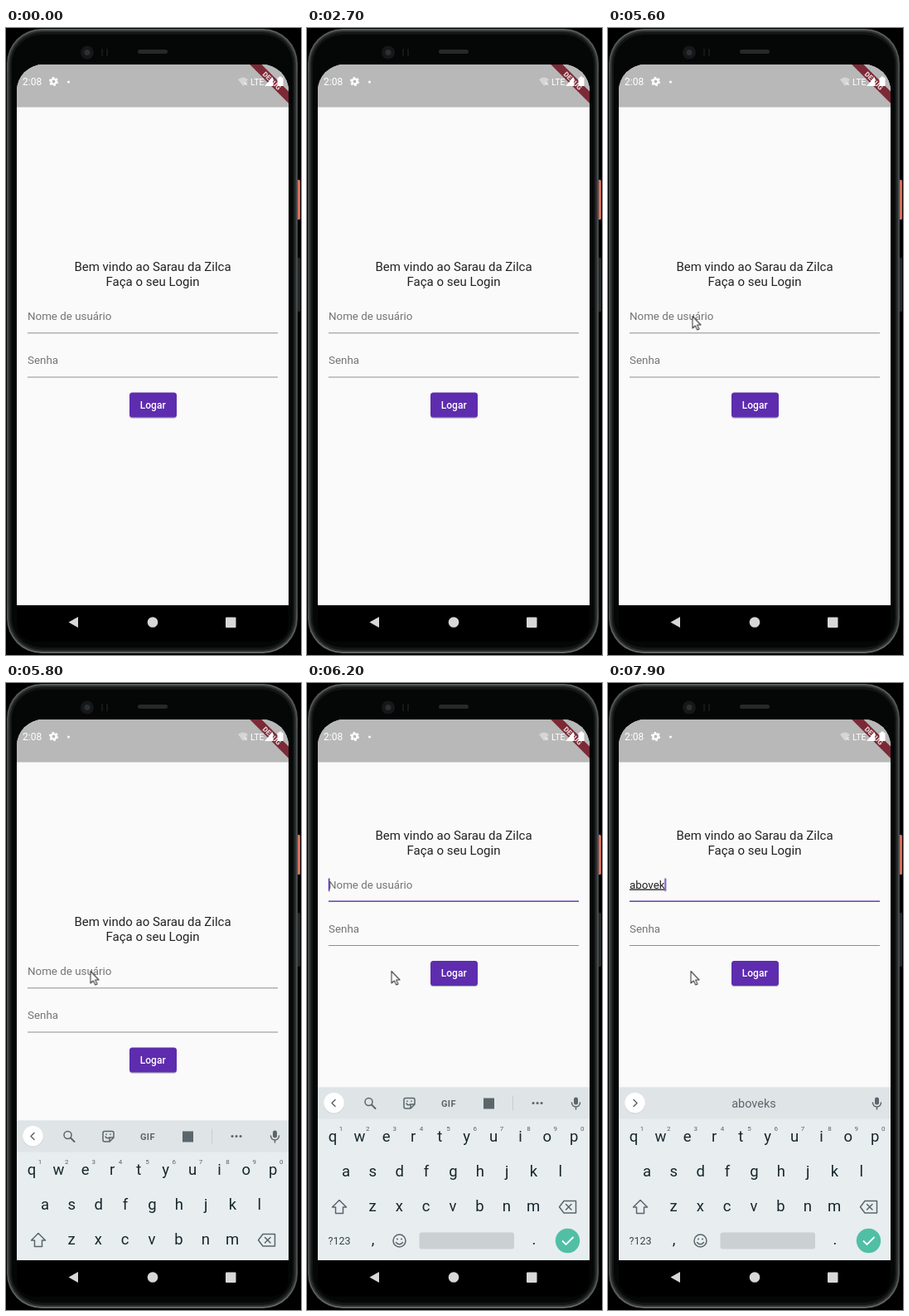
These frames come from a looping animation (356x756 px, 8000 ms). An HTML page:

```html
<!DOCTYPE html>
<html lang="pt-BR">
<head>
<meta charset="utf-8">
<title>Login</title>
<style>
  html, body { margin: 0; height: 100%; overflow: hidden; background: #000; }
  svg { display: block; width: 100vw; height: 100vh; font-family: Roboto, sans-serif; }
  .mid { text-anchor: middle; }
  .title { font-size: 15px; fill: #222; }
  .input { font-size: 13.36px; fill: #222; }
  .hint { font-size: 13.36px; fill: #747474; }
  .key { font-size: 18.5px; fill: #17272c; }
  .digit { font-size: 8px; fill: #56636a; }
  .word { font-size: 14.5px; fill: #5c676c; }
  .icon { fill: none; stroke: #5a666b; stroke-width: 1.5; stroke-linejoin: round; stroke-linecap: round; }
  .solid { fill: #5a666b; }
</style>
</head>
<body>
<svg viewBox="0 0 356 756">
  <defs>
    <linearGradient id="rim" x2="0" y2="1">
      <stop offset="0" stop-color="#5a5d5d"/><stop offset=".08" stop-color="#474a4a"/>
      <stop offset=".92" stop-color="#474a4a"/><stop offset="1" stop-color="#626565"/>
    </linearGradient>
    <clipPath id="screen"><path d="M13 696V76A32 32 0 0 1 45 44H309A32 32 0 0 1 341 76V696Z"/></clipPath>
  </defs>

  <!-- phone body -->
  <rect x="351" y="183" width="4" height="48" rx="1.5" fill="#d9705f"/>
  <rect x="351" y="277" width="4" height="65" rx="1.5" fill="#25292a"/>
  <rect x="1" y="1" width="351" height="753" rx="42" fill="url(#rim)"/>
  <rect x="3" y="3" width="347" height="749" rx="40" fill="#2b2e2e"/>
  <rect x="5" y="5" width="343" height="745" rx="38" fill="#131515"/>
  <rect x="7" y="8" width="339" height="739" rx="36" fill="#050606"/>
  <circle cx="98" cy="29.500" r="8" fill="#151718"/>
  <circle cx="98" cy="29.500" r="3.500" fill="#2b3032"/>
  <path d="M116 25V34M122 25V34" stroke="#151718" stroke-width="2"/>
  <rect x="159" y="26" width="36" height="5" rx="2.500" fill="#262929"/>
  <path d="M13 696H341V716Q341 740 315 740H39Q13 740 13 716Z" fill="#000"/>

  <g clip-path="url(#screen)">
    <rect x="13" y="43" width="328" height="654" fill="#fafafa"/>
    <rect x="13" y="43" width="328" height="52.500" fill="#b8b8b8"/>

    <g transform="translate(341 43.5) rotate(45)">
      <rect x="-33.400" y="23.400" width="66.800" height="10" fill="#7c2936"/>
      <text class="mid" y="31.500" font-size="8.500" font-weight="900" fill="#e6d4d6">DEBUG</text>
    </g>

    <!-- status bar -->
    <g fill="#fff">
      <text x="20" y="69" font-size="12">2:08</text>
      <circle cx="57.500" cy="64.500" r="3.100" fill="none" stroke="#fff" stroke-width="2.400"/>
      <circle cx="57.500" cy="64.500" r="4.700" fill="none" stroke="#fff" stroke-width="1.800" stroke-dasharray="2.46"/>
      <circle cx="75.500" cy="65" r="1.500"/>
      <path d="M280 62Q286 57 292 62L286 70Z" opacity=".4"/>
      <path d="M287.500 65.500L291 69M291 65.500L287.500 69" stroke="#fff"/>
      <text x="295" y="68.500" font-size="10.500">LTE</text>
      <path d="M312 70L322 59V70Z"/>
      <path d="M327.500 60H329.500V58.500H332.500V60H334.500V70H327.500Z"/>
    </g>

    <g id="form">
      <text class="title mid" x="177" y="293">Bem vindo ao Sarau da Zilca</text>
      <text class="title mid" x="177" y="311">Faça o seu Login</text>
      <text id="hint" class="hint" x="26" y="352">Nome de usuário</text>
      <g id="typed"></g>
      <rect id="caret" x="25.800" y="340" width="1.700" height="15.500" fill="#6236b5"/>
      <path d="M26 367.800H328M26 421H328" stroke="#8e8e8e"/>
      <path id="focus" d="M26 367.800H328" stroke="#673ab7" stroke-width="1.800"/>
      <text class="hint" x="26" y="405.200">Senha</text>
      <rect x="149" y="441" width="57" height="30" rx="3.500" fill="#000" opacity=".12"/>
      <rect x="149" y="440" width="57" height="30.500" rx="3.500" fill="#000" opacity=".18"/>
      <rect x="149" y="439.500" width="57" height="30" rx="3.500" fill="#5e2cae"/>
      <text class="mid" x="177.200" y="458.700" font-size="12" font-weight="500" fill="#fff">Logar</text>
    </g>

    <g id="keyboard">
      <rect x="13" y="487.500" width="328" height="210" fill="#e8edf0"/>
      <rect x="13" y="487.500" width="328" height="38" fill="#dfe4e7"/>
      <circle cx="32.500" cy="507" r="12.500" fill="#000" opacity=".1"/>
      <circle cx="32.500" cy="506.300" r="12.300" fill="#fff"/>
      <g id="tools" class="icon">
        <path d="M34 502.500L30 506.500L34 510.500"/>
        <circle cx="74.500" cy="505" r="4.500"/><path d="M78 508.500L82.500 513" stroke-width="2"/>
        <path d="M119 500.500H128Q130 500.500 130 502.500V508L125 513H119Q117 513 117 511V502.500Q117 500.500 119 500.500ZM125 513V508H130M120 507Q122 510 124.500 508"/>
        <path d="M121 504V504.500M126 504V504.500"/>
        <text class="mid solid" x="171" y="510.500" font-size="11" font-weight="700" stroke="none" letter-spacing=".5">GIF</text>
        <rect class="solid" x="213" y="500.500" width="13" height="13" stroke="none"/>
        <path d="M248.500 498V515" stroke="#c6ccd0" stroke-width="1"/>
        <path d="M273 506.500H273.100M278 506.500H278.100M283 506.500H283.100" stroke-width="3"/>
      </g>
      <path id="opened" class="icon" d="M31 502.500L35 506.500L31 510.500"/>
      <path id="bars" d="M128.500 497V516M224.500 497V516" stroke="#c6ccd0"/>
      <g id="words"></g>
      <rect class="solid" x="322" y="499.500" width="5" height="9" rx="2.500"/>
      <path class="icon" d="M319.500 506Q320 511 324.500 511T329.500 506M324.500 511V514"/>
      <g id="keys"></g>
      <g class="icon">
        <path d="M39 623.500L47.500 632H43.500V639.500H34.500V632H30.500Z"/>
        <path d="M310 624.500H324.500V639H310L304.500 631.800ZM312.500 628.500L319 635M319 628.500L312.500 635"/>
        <circle cx="111.500" cy="672.500" r="7.500"/>
        <path d="M109 670.500V670.600M114 670.500V670.600" stroke-width="2"/>
        <path d="M107.500 674.500Q111.500 679 115.500 674.500"/>
      </g>
      <text class="mid" x="39" y="677" font-size="12.500" fill="#37454a">?123</text>
      <rect x="135.500" y="662.500" width="114.500" height="20" rx="3" fill="#cbd0d3"/>
      <circle cx="314.500" cy="672.500" r="14.700" fill="#50bfa5"/>
      <path d="M308 672.500L312.500 677L321.500 668" fill="none" stroke="#fff" stroke-width="1.800"/>
    </g>
  </g>

  <!-- navigation bar -->
  <g fill="#d8d8d8">
    <path d="M75.500 716.500L87 710V723Z"/>
    <circle cx="177" cy="716.500" r="6.300"/>
    <rect x="265" y="710.500" width="12.500" height="12.500" rx="1"/>
  </g>

  <path id="mouse" d="M.5 .5V15L3.800 12L6.300 17L8.500 16L6.200 11H10.500Z" fill="#fff" stroke="#3c4043" stroke-width="1.100" stroke-linejoin="round"/>
</svg>

<script>
  const LOOP = 8000;
  const byId = id => document.getElementById(id);
  const sheet = document.head.appendChild(document.createElement('style')).sheet;
  let count = 0;

  // Holds each [time, declarations] pose until the next one.
  function poses(el, list) {
    const name = 'pose' + count++;
    const body = list.map(([ms, css]) => `${ms / LOOP * 100}% {${css}}`).join(' ');
    sheet.insertRule(`@keyframes ${name} {${body}}`, sheet.cssRules.length);
    el.style.animation = `${name} ${LOOP}ms step-end infinite`;
  }
  const see = on => `visibility: ${on ? 'visible' : 'hidden'}`;
  const move = (x, y) => `transform: translate(${x}px, ${y}px)`;
  const during = (el, from, to = LOOP) =>
    poses(el, [[0, see(from === 0)], [from, see(true)], [to, see(false)]]);

  function text(parent, content, x, y, className) {
    const el = document.createElementNS('http://www.w3.org/2000/svg', 'text');
    el.textContent = content;
    el.setAttribute('x', x);
    el.setAttribute('y', y);
    el.setAttribute('class', className);
    return parent.appendChild(el);
  }

  // keys
  const PITCH = 32.35, keys = byId('keys');
  [['qwertyuiop', 31, 553], ['asdfghjkl', 47, 594.5], ['zxcvbnm', 79, 637]].forEach(([row, left, y], r) =>
    [...row].forEach((letter, i) => {
      const x = left + i * PITCH;
      text(keys, letter, x, y, 'key mid');
      if (r === 0) text(keys, (i + 1) % 10, x + 10, 540, 'digit mid');
    }));
  text(keys, ',', 79.5, 677, 'key mid');
  text(keys, '.', 274, 677, 'key mid');

  // typing: time, input, suggestions
  const typing = [
    [6900, 'a', ['a', 'and', 'also']],
    [7200, 'ab', ['ab', 'about', 'able']],
    [7300, 'abo', ['abo', 'about', 'above']],
    [7500, 'abov', ['abov', 'above', 'about']],
    [7700, 'above', ['', 'above', '']],
    [7900, 'abovek', ['', 'aboveks', '']]
  ];
  const caret = [[0, see(false)], [6100, see(true)], [6600, see(false)]];
  typing.forEach(([from, input, words], i) => {
    const to = typing[i + 1]?.[0];
    const el = text(byId('typed'), input, 26, 352, 'input');
    el.setAttribute('text-decoration', 'underline');
    during(el, from, to);
    caret.push([from, see(true) + ';' + move(el.getComputedTextLength(), 0)]);
    words.forEach((word, k) => during(text(byId('words'), word, 86.5 + k * 89.5, 512, 'word mid'), from, to));
  });
  poses(byId('caret'), caret);

  during(byId('tools'), 0, 6900);
  during(byId('opened'), 6900);
  during(byId('bars'), 6900, 7700);
  poses(byId('hint'), [[0, 'opacity: 1'], [7100, 'opacity: .5'], [7200, 'opacity: 0']]);
  poses(byId('form'), [[0, move(0, 0)], [6000, move(0, -104.5)]]);
  poses(byId('focus'), [[0, 'opacity: 0'], [6000, 'opacity: .5'], [6100, 'opacity: 1']]);
  poses(byId('keyboard'), [[0, move(0, 215)], [5800, move(0, 40)], [5900, move(0, .8)], [6000, move(0, 0)]]);

  const at = (x, y) => see(true) + ';' + move(x, y);
  poses(byId('mouse'), [
    [0, see(false)], [3400, at(117.5, 347.5)], [3800, at(97.5, 347.5)], [3900, see(false)],
    [5000, at(116.5, 341.5)], [5300, at(108, 341.5)], [5500, at(89, 344)],
    [5600, at(101.5, 347)], [6600, at(99.5, 347)]
  ]);
</script>
</body>
</html>
```
